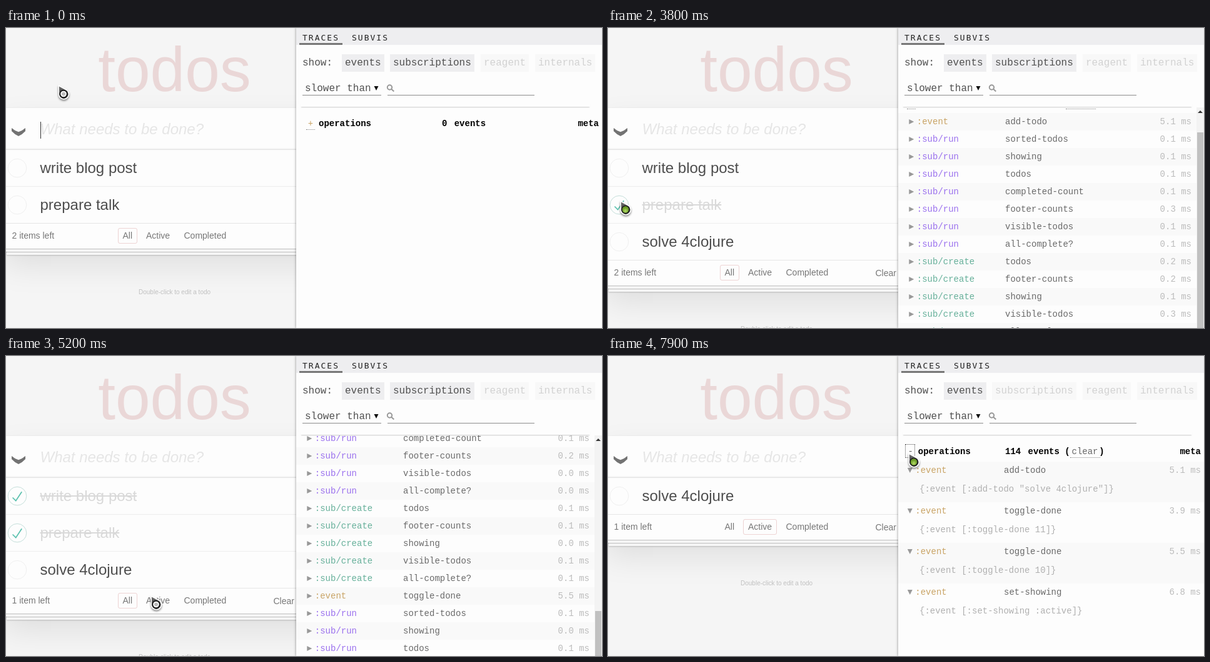
Write an HTML page that moves like this. It is 953 px wide and 480 px high and loops after 8000 ms.

```html
<!DOCTYPE html>
<html lang="en">
<head>
<meta charset="utf-8">
<title>Todos with trace panel</title>
<style>
html, body { margin: 0; width: 100%; height: 100%; overflow: hidden; background: #f5f5f5; }
#stage { position: relative; width: 953px; height: 480px; overflow: hidden; background: #f5f5f5;
  font: 14px "Liberation Sans", Arial, sans-serif; color: #777; }
#stage div, #stage svg, p { position: absolute; margin: 0; }
p { white-space: pre; line-height: 20px; }
.mono p { font-family: "Liberation Mono", "Courier New", monospace; }
.title { font-size: 100px; color: rgba(175,47,47,.15); }
.card { left: -5px; top: 128px; width: 550px; background: #fdfdfd;
  box-shadow: 0 2px 4px rgba(0,0,0,.2), 0 25px 50px rgba(0,0,0,.1); }
.sheets { left: 0; right: 0; bottom: 0; height: 50px;
  box-shadow: 0 1px 1px rgba(0,0,0,.2), 0 8px 0 -3px #f6f6f6, 0 9px 1px -3px rgba(0,0,0,.2),
    0 16px 0 -6px #f6f6f6, 0 17px 2px -6px rgba(0,0,0,.2); }
.paper { inset: 0; background: #fdfdfd; }
.entry { left: 0; right: 0; height: 66px; box-shadow: inset 0 -2px 1px rgba(0,0,0,.03); }
.rule { left: 0; width: 464px; height: 1px; }
.big { font-size: 24px; color: #4d4d4d; }
.done { color: #d9d9d9; text-decoration: line-through; }
.ghost { font-style: italic; color: #e6e6e6; }
.caret { display: inline-block; width: 1px; height: 27px; margin: -6px -1px -6px 0; background: #333; vertical-align: middle; }
.chosen { border: 1px solid rgba(175,47,47,.2); border-radius: 3px; box-sizing: border-box; height: 25px; }
.hint { font-size: 10px; color: #bfbfbf; text-shadow: 0 1px 0 rgba(255,255,255,.5); }
.panel { left: 464px; top: 0; width: 489px; height: 480px; background: #fdfdfd; box-shadow: 0 0 4px rgba(0,0,0,.45); }
.nav { left: 464px; top: 0; width: 489px; height: 27px; background: #eeeef0; }
.nav + div { left: 469px; top: 24px; width: 69px; height: 3px; background: #777; }
#stage .tab { font: 13px/20px "DejaVu Sans Mono", monospace; letter-spacing: 2px; color: #222; }
.ctl { font-size: 16px; color: #505050; }
.chip { top: 42px; height: 28px; background: #eeeef0; }
.off.chip { background: #f8f8f8; }
.off.ctl { color: #d2d2d2; }
.line { top: 107px; height: 1px; background: #8c8c8c; }
.lip { left: 471px; top: 118px; width: 463px; height: 8px; background: #fdfdfd; box-shadow: 0 2px 2px -1px rgba(0,0,0,.2); }
.clip { left: 464px; top: 127px; width: 489px; height: 353px; overflow: hidden; }
.table { left: -464px; top: -127px; width: 953px; height: 0; }
.head { font-weight: bold; color: #000; }
.link { color: #666; }
.dots { border-bottom: 1px dotted #888; }
.focus { border: 1px dotted #555; box-sizing: border-box; }
.stripe { left: 464px; background: #f9f9f9; }
.tri { width: 8px; height: 8px; background: #999; clip-path: polygon(0 0, 100% 50%, 0 100%); }
.tri.open { clip-path: polygon(0 0, 100% 0, 50% 100%); }
.event { color: #c9a466; }
.run { color: #9a70ee; }
.create { color: #66b09a; }
.name { color: #6a6a6a; }
.meta { color: #bcbcbc; }
.detail { color: #b0b0b0; }
.bar { left: 941px; top: 127px; width: 12px; height: 353px; background: #f3f3f3; }
.thumb { left: 1px; width: 10px; height: 480px; background: #c1c1c1; }
</style>
</head>
<body>
<div id="stage">
  <div id="app"></div>
  <div id="tools" class="mono"></div>
  <svg id="pointer" width="30" height="34" viewBox="-3 -3 30 34">
    <defs>
      <linearGradient id="body" x2="0" y2="1"><stop stop-color="#777"/><stop offset="1" stop-color="#222"/></linearGradient>
      <radialGradient id="lime" cy=".7"><stop stop-color="#b5dc6a"/><stop offset="1" stop-color="#679a22"/></radialGradient>
    </defs>
    <g style="filter:drop-shadow(0 2px 1.5px rgba(0,0,0,.45))">
      <path d="M0 0L13.5 7.5A8 8 0 1 1 .6 15.5Z" fill="url(#body)" stroke="#fff" stroke-width="1.6" stroke-linejoin="round"/>
    </g>
    <circle cx="8" cy="13.5" r="6.8" fill="#1c1c1c"/>
    <circle cx="8" cy="13.5" r="4.8" fill="#fff"/>
    <circle id="core" cx="8" cy="13.5"/>
  </svg>
</div>
<script>
const LOOP = 8000, STEP = 100, ROW = 28;
const $ = id => document.getElementById(id);

const draft = "solve 4clojure";
const keyTimes = [300, 500, 600, 700, 800, 1000, 1300, 1500, 1600, 1700, 1900, 2000, 2100, 2200];
const at = { add: 2300, blur: 3600, first: 3700, footer: 4400, second: 4500, active: 5600, filter: 6700, expand: 7900 };

// [time, x, y]
const path = [[0, 84, 92], [2700, 84, 92], [2800, 84, 106], [3500, 20, 277], [3800, 20, 277], [4200, 21, 227],
  [4500, 21, 227], [4900, 198, 352], [5200, 232, 384], [5600, 232, 384], [5800, 347, 275], [6300, 680, 53],
  [7000, 680, 53], [7800, 481, 156], [8000, 481, 156]];
const presses = [[3700, 3900], [4500, 4700], [5600, 6000], [6700, 7200], [7900, 8000]];
// [start, from, to], each lasting 500 ms
const scrolls = [[3700, 0, 163], [4560, 163, 527], [5580, 527, 751]];

const runs = ["sorted-todos", "showing", "todos", "completed-count", "footer-counts", "visible-todos", "all-complete?"];
const creates = ["todos", "footer-counts", "showing", "visible-todos", "all-complete?"];

function batch(event, ms, arg, runMs, createMs) {
  const sub = (kind, names, times) => names.map((name, i) => ({ kind, op: ":sub/" + kind, name, ms: times[i] }));
  return [{ kind: "event", op: ":event", name: event, ms, detail: `{:event [:${event} ${arg}]}` },
    ...sub("run", runs, runMs), ...sub("create", creates, createMs)];
}
const traces = [
  ...batch("add-todo", 5.1, '"solve 4clojure"', [.1, .1, .1, .1, .3, .1, .1], [.2, .2, .1, .3, .2]),
  ...batch("toggle-done", 3.9, "11", [.1, 0, 0, .1, .2, 0, 0], [.1, .1, 0, .1, .1]),
  ...batch("toggle-done", 5.5, "10", [.1, 0, .1, .1, .2, .1, 0], [.1, .1, 0, .1, .1]),
  ...batch("set-showing", 6.8, ":active", [.1, .1, .1, .1, .2, .1, .1], []).slice(0, 8)
];

const text = (x, y, s, cls = "") => `<p class="${cls}" style="left:${x}px;top:${y - 10}px">${s}</p>`;
const box = (cls, style, inner = "") => `<div class="${cls}" style="${style}">${inner}</div>`;
const svg = (x, y, w, h, inner) => `<svg style="left:${x}px;top:${y}px" width="${w}" height="${h}">${inner}</svg>`;
const mix = (a, b, k) => a + (b - a) * Math.min(1, Math.max(0, k));

function todo(title, done, y) {
  const tick = done ? '<path fill="#5dc2af" d="M72 25L42 71 27 56l-4 4 20 20 34-52z"/>' : "";
  return text(54.5, y, title, "big" + (done ? " done" : "")) +
    `<svg style="left:-5px;top:${y - 20}px" width="40" height="40" viewBox="-10 -18 100 135">
      <circle cx="50" cy="50" r="50" fill="none" stroke="${done ? "#bddad5" : "#ededed"}" stroke-width="3"/>${tick}</svg>`;
}

function drawApp(t) {
  const typed = t < at.add ? draft.slice(0, keyTimes.filter(k => k <= t).length) : "";
  const caretOn = t < at.blur && !(t >= 2900 && t < 3400);
  const active = t >= at.active;
  let items = [["write blog post", t >= at.second], ["prepare talk", t >= at.first]];
  if (t >= at.add) items.push([draft, false]);
  const left = t >= at.footer ? 1 : items.filter(i => !i[1]).length;
  if (active) items = items.filter(i => !i[1]);

  const foot = 194 + 59 * items.length, mid = foot + 20;
  const rule = (y, c) => box("rule", `top:${y}px;background:${c}`);
  $("app").innerHTML =
    text(147.2, 66, "todos", "title") +
    box("card", `height:${foot + 41 - 128}px`, box("sheets", "") + box("paper", "") + box("entry", "")) +
    svg(9, 160, 23, 14, '<path fill="#737373" d="M0 0Q5 4.5 11 6.2 17 4.5 22 0V5Q17 10.5 11 13 5 10.5 0 5Z"/>') +
    (typed ? "" : text(54.5, 162, "What needs to be done?", "big ghost")) +
    text(54.5, 162, typed + (caretOn ? '<i class="caret"></i>' : ""), "big") +
    rule(194, "#e0e0e0") +
    items.map(([title, done], i) => todo(title, done, 224 + 59 * i) + (i ? rule(194 + 59 * i, "#ededed") : "")).join("") +
    rule(foot, "#e6e6e6") +
    text(9.5, mid, `${left} item${left > 1 ? "s" : ""} left`) +
    text(186.5, mid, "All") + text(224, mid, "Active") + text(284.5, mid, "Completed") +
    box("chosen", `top:${mid - 12}px;` + (active ? "left:216px;width:54px" : "left:179px;width:31px")) +
    (t >= at.first ? text(427.5, mid + 1, "Clear completed") : "") +
    text(212, foot + 111, "Double-click to edit a todo", "hint");
}

function eventCount(t) {
  if (t < at.add) return 2 * keyTimes.filter(k => k <= t).length;
  return [[at.active, 114], [at.second, 94], [at.first, 74], [at.blur, 54], [at.add, 52]].find(c => t >= c[0])[1];
}

function layout(t) {
  if (t < 300) return { op: 495.5, name: 695, head: 697, right: 948 };
  if (t < 800) return { op: 495.5, name: 641, head: 644.5, right: 948 };
  if (t < at.add) return { op: 495.5, name: 641, head: 641, right: 948 };
  if (t < at.first) return { op: 495.5, name: 641, head: 643, right: 948 };
  if (t < at.active) return { op: 493.8, name: 635, head: 637, right: 933 };
  if (t < at.filter) return { op: 492.8, name: 631, head: 633, right: 933 };
  return { op: t < at.expand ? 495.5 : 491.3, name: 633, head: 635, right: 948 };
}

function tableHead(t, col) {
  const n = String(eventCount(t)), open = t >= at.expand;
  const word = col.head + n.length * 8.4 + 11.3, paren = word + 58.8;
  return (open ? box("focus", "left:475px;top:141px;width:16px;height:22px") + text(479.5, 153, "-", "link")
      : box("dots", `left:${col.op - 15.5}px;top:145px;width:14px;height:17px`) + text(col.op - 12.7, 153, "+", "event")) +
    text(col.op + 4.5, 153, "operations", "head") +
    text(col.head, 153, n, "head") + text(word, 153, "events", "head") +
    (n === "0" ? "" : text(paren, 153, "(", "head") + text(paren + 11.2, 153, "clear", "link") +
      box("dots", `left:${paren + 8.4}px;top:145px;width:48px;height:17px`) + text(paren + 55, 153, ")", "head")) +
    text(col.right - 33.6, 153, "meta", "head");
}

function tableRows(t, col) {
  const open = t >= at.expand, pitch = open ? 65 : ROW;
  const shown = t < at.add ? 0 : t < at.first ? 13 : t < at.second ? 26 : t < at.active ? 39 : traces.length;
  return traces.slice(0, shown).filter(r => t < at.filter || r.kind === "event").map((r, i) => {
    const y = 183 + pitch * i;
    return (i % 2 ? "" : box("stripe", `top:${y - 14}px;width:${col.right < 940 ? 477 : 489}px;height:${pitch}px`)) +
      box(open ? "tri open" : "tri", `left:${col.op - 12.5}px;top:${y - 4}px`) +
      text(col.op, y, r.op, r.kind) + text(col.name, y, r.name, "name") +
      text(col.right - 50.4, y, r.ms.toFixed(1) + " ms", "meta") +
      (open ? text(498, y + 30, r.detail, "detail") : "");
  }).join("");
}

function scrollBar(t, scroll) {
  if (t < at.first || t >= at.filter) return "";
  const content = t < at.second ? 768 : t < at.active ? 1132 : 1356;
  return box("bar", "", box("thumb", `top:${15.5 + scroll * 571 / content}px`) +
    svg(2, 4, 8, 6, '<path d="M0 5L4 1 8 5Z" fill="#333"/>'));
}

function drawTools(t) {
  const col = layout(t);
  const current = t < at.filter ? scrolls.filter(s => t >= s[0]).pop() : null;
  const scroll = current ? Math.round(mix(current[1], current[2], (t - current[0]) / 500)) : 0;
  const chip = (x, label, on) => box("chip" + (on ? "" : " off"), `left:${x}px;width:${label.length * 9.6 + 10}px`) +
    text(x + 5, 56, label, "ctl" + (on ? "" : " off"));
  $("tools").innerHTML = box("panel", "") +
    box("clip", "", box("table", `transform:translateY(${-scroll}px)`, tableRows(t, col) + tableHead(t, col))) +
    scrollBar(t, scroll) + box("lip", "") +
    box("nav", "") + box("", "") + text(474, 15.5, "TRACES", "tab") + text(553, 15.5, "SUBVIS", "tab") +
    text(474, 56, "show:", "ctl") + chip(537, "events", true) + chip(614, "subscriptions", t < at.filter) +
    chip(759, "reagent", false) + chip(846, "internals", false) +
    text(478, 97, "slower than", "ctl") +
    svg(588, 92, 8, 9, '<path d="M.5 1h7L4 8Z" fill="#111"/>') +
    svg(608, 89, 14, 14, '<g fill="none" stroke="#999" stroke-width="2"><circle cx="5.5" cy="6" r="3.7"/><path d="M8.3 8.8L12.3 12.5"/></g>') +
    box("line", "left:474px;width:126px") + box("line", "left:610px;width:235px");
}

function drawPointer(t) {
  const i = path.findIndex(p => p[0] > t), [t0, x0, y0] = path[i - 1], [t1, x1, y1] = path[i];
  const k = (t - t0) / (t1 - t0), pressed = presses.some(([a, b]) => t >= a && t < b);
  $("pointer").style.transform = `translate(${mix(x0, x1, k) - 3}px,${mix(y0, y1, k) - 3}px)`;
  $("core").setAttribute("r", pressed ? 5.2 : 3);
  $("core").setAttribute("fill", pressed ? "url(#lime)" : "#bbb");
}

let last = -1;
const start = performance.now();
function frame() {
  const t = Math.floor((performance.now() - start) % LOOP / STEP) * STEP;
  if (t !== last) {
    drawApp(t);
    drawTools(t);
    drawPointer(t);
    last = t;
  }
  requestAnimationFrame(frame);
}
frame();
</script>
</body>
</html>
```
